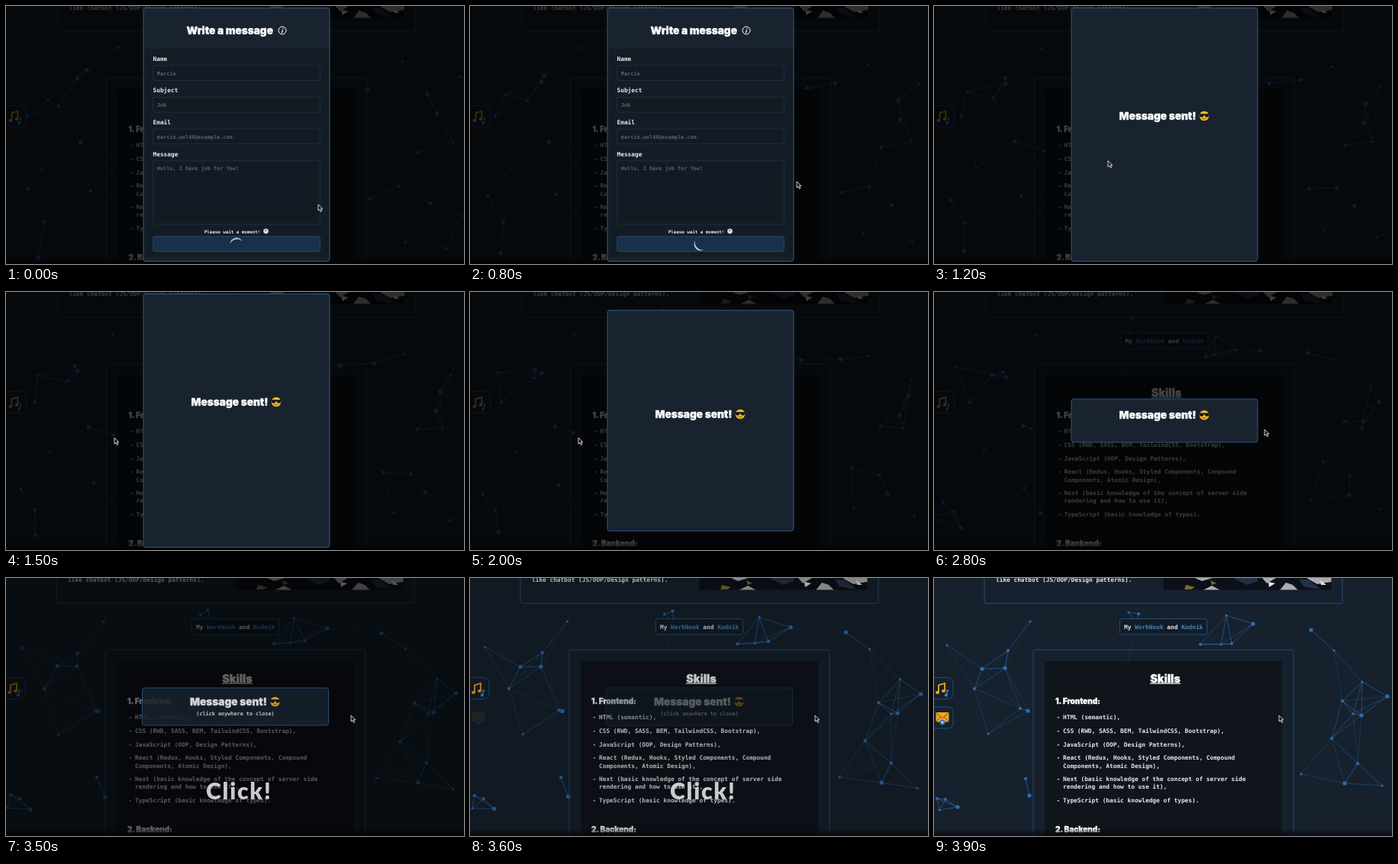
Write an HTML page that moves like this. It is 600 by 338 pixels and loops after 4000 ms.

```html
<!DOCTYPE html>
<html lang="en">
<head>
<meta charset="utf-8">
<title>Contact form</title>
<style>
  html, body { margin: 0; width: 100%; height: 100%; overflow: hidden; background: #16212d; }
  svg { display: block; width: 600px; height: 338px; }
  text { font: bold 7.8px "DejaVu Sans Mono", "Noto Sans Mono", monospace; fill: #e6e9ec; white-space: pre; }
  .head { font: 900 13.6px Inter, sans-serif; fill: #fff; stroke: #fff; stroke-width: .35; }
  .mid { text-anchor: middle; }
  .sub { font-size: 10px; }
  .small { font-size: 6.8px; }
  .link { fill: #3d86c6; }
  .hint { font-size: 6.85px; fill: #59626b; }
  .box { fill: none; stroke: #28588c; stroke-width: .8; }
  .field { fill: #121b23; stroke: #20344a; stroke-width: .8; }
  #click { font: 900 30px Lato, sans-serif; letter-spacing: 1.8px; fill: #e4e6e8; opacity: .88; }
</style>
</head>
<body>
<svg viewBox="0 0 600 338">
  <defs>
    <linearGradient id="shade" x2="0" y2="1">
      <stop stop-color="#05080c" stop-opacity="0"/>
      <stop offset="1" stop-color="#05080c" stop-opacity=".85"/>
    </linearGradient>
    <clipPath id="photo"><path d="M300.500 0h220v15.500h-220z"/></clipPath>
  </defs>

  <g id="page">
    <path fill="#16212d" d="M-5 0h610v338H-5z"/>
    <g id="net" stroke="#2b69ad" fill="#2d6db3"></g>

    <rect class="box" x="66" y="-9" width="469" height="42.200" rx="2"/>
    <text x="81" y="5.300">like chatbot (JS/OOP/Design patterns).</text>
    <g clip-path="url(#photo)">
      <path fill="#0c1019" d="M300 0h221v16h-221z"/>
      <path fill="#a9adb0" d="M342 0l9 4 14-4zM352 16l12-6 11 6zM430 0l6 7 12-7zM453 16l8-10 9 3 7 7zM488 0l14 8 19-3V0z"/>
      <path fill="#223046" d="M392 0l18 9 14-5V0zM478 2l6 9 14 3h8L490 2z"/>
      <path fill="#7d6536" d="M330 9l12 3-5 3h-9zM362 3l8 4-6 2z"/>
      <path fill="#e3e4e2" d="M438 5l9 2-8 5zM506 3l8 6h-7z"/>
    </g>

    <rect class="box" x="243.500" y="53.500" width="114" height="20.500" rx="2" style="fill:#131c26"/>
    <text x="249" y="66.600">My <tspan class="link">WorkNook</tspan> and <tspan class="link">Kodnik</tspan></text>

    <rect class="box" x="130" y="94.200" width="341" height="260" rx="2"/>
    <rect x="145" y="109" width="311" height="240" rx="2" fill="#10151c"/>
    <text class="head mid" x="303" y="136.500" style="font-size:14.300px">Skills</text>
    <path fill="#fff" d="M283 137.600h40v1.200h-40z"/>
    <text class="head sub" x="159" y="164.500">1. Frontend:</text>
    <g id="list"></g>
    <text class="head sub" x="159" y="333">2. Backend:</text>

    <path class="box" d="M-3 130.500H19a6 6 0 0 1 6 6v16a6 6 0 0 1-6 6H-3z"/>
    <g transform="translate(.5 1.500)">
      <g fill="none" stroke="#f5a623" stroke-width="1.800">
        <path d="M5.500 148v-9l8-2.500v9.500"/>
        <path d="M16.500 152v-7l2.500 2" stroke="#3d8fd6" stroke-width="1.300"/>
      </g>
      <g fill="#f5a623">
        <ellipse cx="4" cy="148.500" rx="2.500" ry="2.100"/><ellipse cx="12" cy="146.500" rx="2.500" ry="2.100"/>
        <circle cx="15.300" cy="152" r="1.900" fill="#3d8fd6"/>
      </g>
    </g>
    <g id="mail">
      <path class="box" d="M-3 169H19a6 6 0 0 1 6 6v16a6 6 0 0 1-6 6H-3z"/>
      <rect x="2.500" y="176" width="17" height="12.500" rx="1" fill="#f5a623"/>
      <path d="M3 177l8 6.500 8-6.500M3 188l5.500-6M19 188l-5.500-6" fill="none" stroke="#7a4c0c"/>
      <circle cx="11" cy="189" r="3.600" fill="#2f7cc4"/><circle cx="11" cy="189" r="1.300" fill="#d9ecfa"/>
    </g>
    <path fill="url(#shade)" d="M-5 328h610v10H-5z"/>
  </g>

  <path id="dim" d="M0 0h600v338H0z"/>

  <g id="modal">
    <rect id="panel" x="178.500" width="244" rx="3" fill="#18232f" stroke="#2b5a8e"/>
    <g id="form">
      <path fill="#141d26" d="M179.500 56h242v274h-242z"/>
      <text class="head mid" x="291.700" y="37">Write a message</text>
      <circle cx="360.500" cy="32" r="5" fill="none" stroke="#fff"/>
      <path d="M361.600 29l-.4 1.200M360.900 31.400l-1 4" stroke="#fff" stroke-width="1.300"/>
      <g id="fields"></g>
      <text class="mid" x="295" y="297.800" style="font-size:5.800px">Please wait a moment!</text>
      <circle cx="339" cy="295" r="3.300" fill="#dfe3e6" stroke="#8b949c" stroke-width=".7"/>
      <path d="M339 295v-2M339 295l-1.500-1" stroke="#333" stroke-width=".6"/>
      <rect x="191.300" y="302" width="218.500" height="19.500" rx="2" fill="#17304c" stroke="#234a73"/>
      <path id="spinner" fill="#c3c8cd" d="M-8.500 0A8.500 8.500 0 0 1 8.500 0A8.500 6.300 0 0 0-8.500 0z"/>
    </g>
    <g id="sent">
      <text class="head mid" x="291.500" y="5">Message sent!</text>
      <circle cx="352.500" cy="0" r="6.300" fill="#f6b92f"/>
      <path fill="#15181d" d="M346 -2.800h13v1.500q-.5 3-3 3t-3-2.500h-1q-.5 2.500-3 2.500t-3-3z"/>
      <path d="M350 3.300q2.800 1.800 5 0" fill="none" stroke="#6d3f10" stroke-width=".9"/>
    </g>
    <text id="note" class="small mid" x="300.500" y="180">(click anywhere to close)</text>
  </g>

  <text id="click" class="mid" x="305.300" y="289.800">Click!</text>
  <path id="cursor" d="M0 0v8l1.900-1.700 1.500 3.100 1.400-.7-1.500-2.900h2.600z" fill="#111" stroke="#fff" stroke-width=".8"/>
</svg>

<script>
const $ = id => document.getElementById(id);
const mod = (a, n) => ((a % n) + n) % n;
const ramp = (t, from, to) => {
  const p = Math.min(1, Math.max(0, (t - from) / (to - from)));
  return p * p * (3 - 2 * p);
};
const show = (id, opacity) => { $(id).style.opacity = +opacity; };
const move = (id, x, y, angle = 0) =>
  $(id).setAttribute('transform', `translate(${x} ${y}) rotate(${angle})`);

const skills = [
  [185.4, 'HTML (semantic),'],
  [203, 'CSS (RWD, SASS, BEM, TailwindCSS, Bootstrap),'],
  [220.5, 'JavaScript (OOP, Design Patterns),'],
  [238.3, 'React (Redux, Hooks, Styled Components, Compound', 'Components, Atomic Design),'],
  [266.1, 'Next (basic knowledge of the concept of server side', 'rendering and how to use it),'],
  [294.1, 'TypeScript (basic knowledge of types).']
];
$('list').innerHTML = skills.map(([y, ...lines]) =>
  `<text x="160.500" y="${y}">-</text>` +
  lines.map((line, i) => `<text x="169" y="${y + i * 10.2}">${line}</text>`).join('')).join('');

const fields = [
  ['Name', 'Marcin', 19.5],
  ['Subject', 'Job', 19.5],
  ['Email', 'marcin.wol48@example.com', 19.5],
  ['Message', 'Hello, I have job for You!', 83]
];
$('fields').innerHTML = fields.map(([label, hint, height], i) => {
  const y = 71.7 + i * 41.6;
  return `<text x="191" y="${y}">${label}</text>
    <rect class="field" x="191.300" y="${y + 6.3}" width="218.500" height="${height}" rx="2"/>
    <text class="hint" x="196.300" y="${y + 18.8}">${hint}</text>`;
}).join('');

// Particle places at the end of the loop; each drifts at its own steady speed.
const places = [
  [126, 57], [97, 95], [93, 118], [17, 88], [53, 145], [63, 119], [255, 45], [268, 47], [265, 62],
  [383, 49], [390, 86], [418, 60], [376, 87], [349, 87], [494, 68], [524, 95], [113, 171], [123, 174],
  [561, 136], [535, 161], [594, 155], [549, 178], [521, 210], [560, 180], [481, 257], [555, 243],
  [538, 269], [587, 272], [120, 263], [125, 285], [71, 204], [4, 289], [31, 300], [7, 304], [15, 290],
  [200, 200], [410, 180], [380, 300], [250, 130]
];
const reach = 82;

function drawNet(t) {
  const s = (t - 3900) / 1000;
  const dots = places.map(([x, y], i) => {
    const speed = 5 + i * 7 % 13, angle = i * 2.4 + 3;
    return [
      mod(x + speed * Math.cos(angle) * s + 20, 640) - 20,
      mod(y + speed * Math.sin(angle) * s + 20, 378) - 20
    ].map(v => +v.toFixed(2));
  });
  let out = '';
  dots.forEach(([x, y], i) => {
    for (const [u, v] of dots.slice(i + 1)) {
      const d = Math.hypot(u - x, v - y);
      if (d < reach) out += `<path d="M${x} ${y}L${u} ${v}" stroke-width=".8" opacity="${Math.min(.85, 1.5 * (1 - d / reach)).toFixed(2)}"/>`;
    }
    out += `<circle cx="${x}" cy="${y}" r="${1.6 + i % 3 * .5}" stroke="none"/>`;
  });
  $('net').innerHTML = out;
}

// Each stop: start time, end time, x, y.
const stops = [[0, 800, 428, 230], [850, 1400, 142, 191], [2150, 2750, 433, 180], [2800, 3200, 452, 180]];

function draw(t) {
  drawNet(t);

  const shift = t < 3300 ? 1.5 : 0;
  const closing = ramp(t, 3430, 3700);
  move('page', shift, 0);
  move('modal', shift, 0);
  show('dim', .74 * (1 - closing));
  show('modal', 1 - closing);
  show('mail', ramp(t, 3550, 3800));

  const height = 332 - 283 * ramp(t, 1700, 2920);
  $('panel').setAttribute('y', 168.5 - height / 2);
  $('panel').setAttribute('height', height);

  const sent = t >= 1200;
  show('form', !sent);
  show('sent', sent);
  move('sent', 0, 144 + 16 * ramp(t, 1500, 2000) + 2 * ramp(t, 2400, 3100));
  show('note', ramp(t, 2800, 3100));
  move('spinner', 300.5, 312, t * .294 - 10);

  let [x, y] = [409, 260];
  for (const [from, to, toX, toY] of stops) {
    const p = ramp(t, from, to);
    x += (toX - x) * p;
    y += (toY - y) * p;
  }
  move('cursor', x, y);
  $('click').style.display = t >= 3200 && t < 3800 ? '' : 'none';
}

const step = 100;
function tick() {
  draw(Math.floor(performance.now() % 4000 / step) * step);
  requestAnimationFrame(tick);
}
tick();
</script>
</body>
</html>
```
